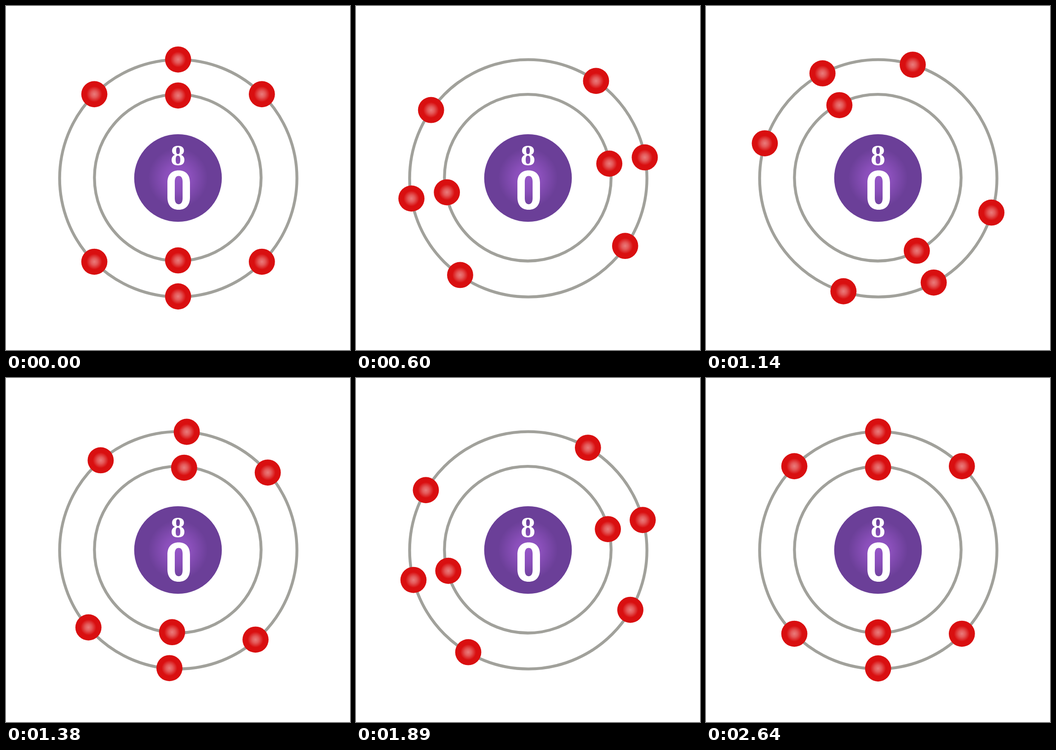
These frames come from a looping animation (748x748 px, 2670 ms). An HTML page:

```html
<!DOCTYPE html>
<html lang="en">
<head>
<meta charset="utf-8">
<title>Atom with orbiting electrons</title>
<style>
  html, body { margin: 0; width: 100%; height: 100%; overflow: hidden; background: #fff; }
  svg { display: block; width: 100vw; height: 100vh; }
  text { font: bold 64px "Liberation Serif", "Times New Roman", serif; text-anchor: middle; }
</style>
</head>
<body>
<svg viewBox="0 0 748 748">
  <defs>
    <radialGradient id="nucleusFill">
      <stop offset="0" stop-color="#9656c8"/>
      <stop offset=".3" stop-color="#8a4fba"/>
      <stop offset=".68" stop-color="#6b3f98"/>
    </radialGradient>
    <radialGradient id="electronFill">
      <stop offset="0" stop-color="#ea7b7b"/>
      <stop offset=".25" stop-color="#e45a5a"/>
      <stop offset=".6" stop-color="#d90f10"/>
    </radialGradient>
  </defs>
  <g fill="none" stroke="#a1a19b" stroke-width="6.3">
    <circle cx="374.6" cy="374.6" r="258"/>
    <circle cx="373.5" cy="373.3" r="181.2"/>
  </g>
  <circle cx="374" cy="374" r="95.3" fill="url(#nucleusFill)"/>
  <g fill="#fff">
    <text x="374" y="346">8</text>
    <path role="img" aria-label="0" fill-rule="evenodd" d="
      M375.5 357.5C391 357.5 400 367 400 384V416C400 433 391 443 375.5 443S351 433 351 416V384C351 367 360 357.5 375.5 357.5Z
      M375.5 369.5C381 369.5 384 374 384 382V418C384 426 381 431 375.5 431S367 426 367 418V382C367 374 370 369.5 375.5 369.5Z"/>
  </g>
  <g id="electrons" fill="url(#electronFill)"></g>
</svg>
<script>
  const STEP = 30, STEPS = 89, HALF_STEP = 45;
  const group = document.getElementById('electrons');

  const addShell = (radius, angles) => angles.map(angle => {
    const dot = document.createElementNS(group.namespaceURI, 'circle');
    dot.setAttribute('r', 28.4);
    group.append(dot);
    return { dot, radius, angle };
  });
  const electrons = [
    ...addShell(257.6, [0, 45, 135, 180, 225, 315]),
    ...addShell(179.3, [0, 180]),
  ];

  // The second half turn is slightly faster than the first.
  const rotation = step => step < HALF_STEP
    ? 180 * step / HALF_STEP
    : 180 + 180 * (step - HALF_STEP) / (STEPS - 1 - HALF_STEP);

  function draw() {
    const turn = rotation(Math.floor(performance.now() / STEP) % STEPS);
    for (const { dot, radius, angle } of electrons) {
      const a = (angle + turn) * Math.PI / 180;
      dot.setAttribute('cx', 374.2 + radius * Math.sin(a));
      dot.setAttribute('cy', 373.9 - radius * Math.cos(a));
    }
    requestAnimationFrame(draw);
  }
  draw();
</script>
</body>
</html>
```
